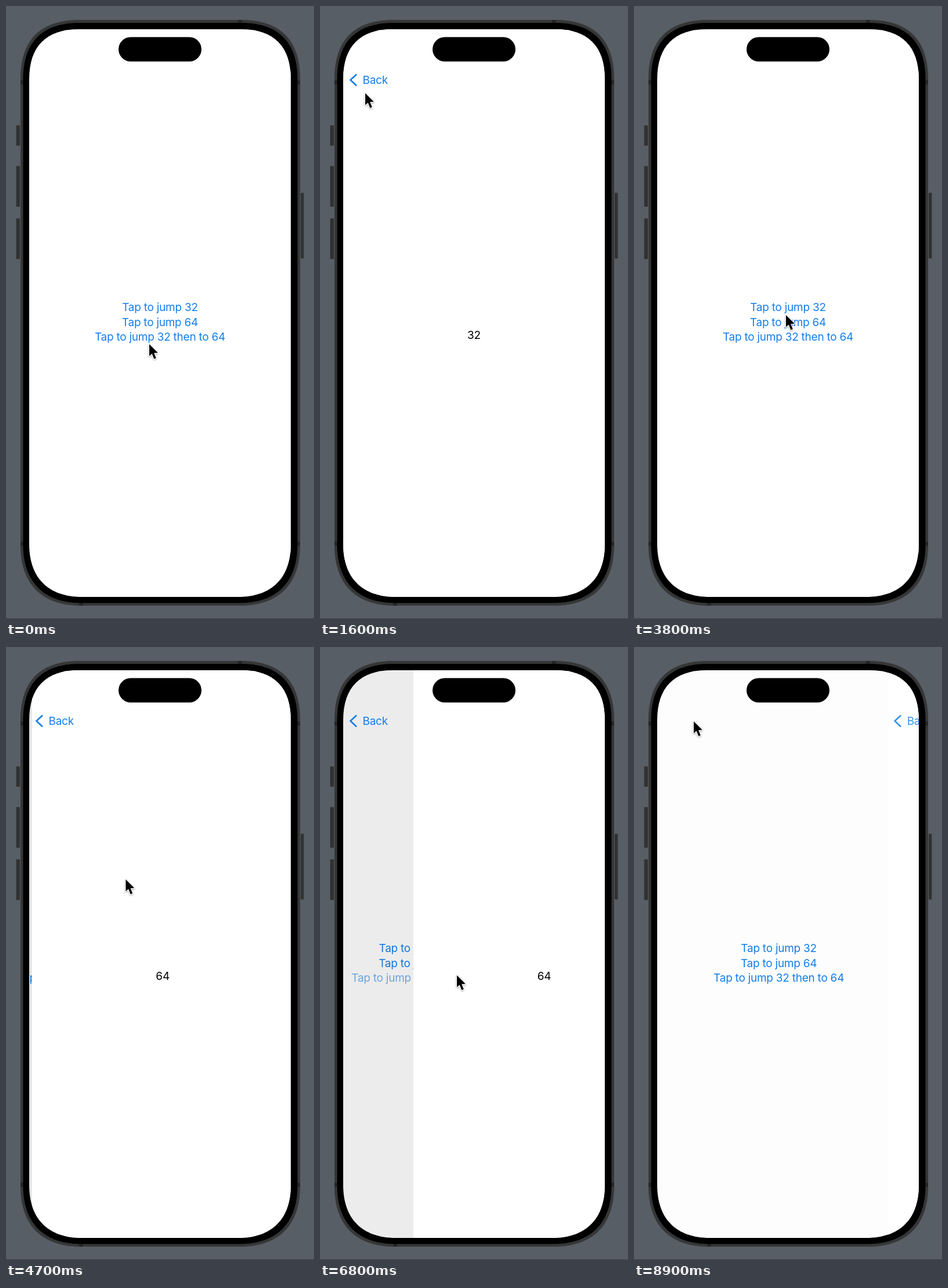
Write an HTML page that moves like this. It is 531 px wide and 1055 px high and loops after 9000 ms.

```html
<!DOCTYPE html>
<html lang="en">
<head>
<meta charset="utf-8">
<title>Navigation jumps</title>
<style>
  html, body { margin: 0; width: 100%; height: 100%; overflow: hidden; background: #575e66; }
  svg { display: block; width: 531px; height: 1055px; }
  text { font: 19px Inter, "Liberation Sans", sans-serif; letter-spacing: -.25px; }
  .link { fill: #147eea; }
  .middle { text-anchor: middle; }
</style>
</head>
<body>
<svg viewBox="0 0 531 1055">
  <defs><clipPath id="screenClip"><path id="screenShape"/></clipPath></defs>
  <rect width="531" height="1055" fill="#575e66"/>
  <rect y="1054" width="531" height="1" fill="#363b41"/>
  <g fill="#303133" stroke="#494b4d">
    <rect x="17.5" y="205.5" width="7" height="35"/>
    <rect x="17.5" y="275.5" width="7" height="70"/>
    <rect x="17.5" y="365.5" width="7" height="70"/>
    <rect x="507.5" y="321.5" width="6" height="113"/>
  </g>
  <path id="rim" fill="#353637" stroke="#5a5c5e"/>
  <g fill="#242526">
    <rect x="400" y="24" width="7" height="6"/>
    <rect x="126" y="1026" width="7" height="6"/>
    <rect x="25" y="128" width="482" height="7"/>
    <rect x="25" y="922" width="482" height="7"/>
  </g>
  <path id="bezel"/>
  <g clip-path="url(#screenClip)">
    <rect x="40" y="40" width="451" height="978" fill="#fff"/>
    <g id="lower">
      <g id="home" class="link middle">
        <text x="265.5" y="525">Tap to jump 32</text>
        <text x="265.5" y="550.5">Tap to jump 64</text>
        <text x="265.5" y="576">Tap to jump 32 then to 64</text>
      </g>
      <text id="lowerNumber" class="middle" x="265.5" y="573">32</text>
    </g>
    <rect id="dim" x="40" y="40" width="451" height="978"/>
    <g id="upper">
      <rect x="40" y="40" width="451" height="978" fill="#fff"/>
      <text id="upperNumber" class="middle" x="265.5" y="573"></text>
    </g>
    <g id="back">
      <path d="M63 117.5L52.5 127.3L63 137.2" fill="none" stroke="#147eea" stroke-width="2.6"/>
      <text class="link" x="73.5" y="134">Back</text>
    </g>
  </g>
  <rect x="194" y="53.5" width="143" height="42" rx="21"/>
  <path id="cursor" d="M0 0V20.5L4.7 16.5L8.3 25.5L11.8 24L8.2 15.2L14.8 14.8Z" stroke="#fff" stroke-width="2.4"
    paint-order="stroke" stroke-linejoin="round" style="filter:drop-shadow(0 1.5px 1.5px rgba(0,0,0,.35))"/>
</svg>
<script>
const $ = id => document.getElementById(id);
const LOOP = 9000, STEP = 100, WIDTH = 450;

// Rectangle with continuous corners that reach e (top) and f (bottom) along each side.
function squircle(x, y, r, b, e, f) {
  const c = e * .34, d = f * .36;
  return `M${x + e} ${y}H${r - e}C${r - c} ${y} ${r} ${y + c} ${r} ${y + e}` +
    `V${b - f}C${r} ${b - d} ${r - d} ${b} ${r - f} ${b}` +
    `H${x + f}C${x + d} ${b} ${x} ${b - d} ${x} ${b - f}` +
    `V${y + e}C${x} ${y + c} ${x + c} ${y} ${x + e} ${y}Z`;
}
$('screenShape').setAttribute('d', squircle(40, 40, 491, 1017, 86, 91));
$('bezel').setAttribute('d', squircle(29.5, 29, 502.5, 1027.5, 97, 100));
$('rim').setAttribute('d', squircle(24.5, 23.5, 507.5, 1032.5, 102, 104));

const transitions = [
  { start: -LOOP, page: 32 },
  { start: 677, page: 32, push: true },
  { start: 1960, page: 32 },
  { start: 4356, page: 64, push: true },
  { start: 5359, page: 64 },
  { start: 6665, page: 64, push: true },
  { start: 7732, page: 64, below: 32 },
  { start: 8708, page: 32 }
];

// Pressed controls: [control, down, up]
const rows = [...$('home').children];
const presses = [
  [rows[0], 600, 677], [$('back'), 1890, 1985],
  [rows[1], 4290, 4360], [$('back'), 5390, 5485],
  [rows[2], 6590, 6675], [$('back'), 7690, 7790], [$('back'), 8690, 8700]
];

// Pointer stops: [time, x, y]
const stops = [
  [0, 247, 582], [500, 262, 516], [720, 262, 516], [1600, 78, 150], [1950, 78, 150],
  [2800, 269, 516], [3100, 223, 527], [3700, 223, 527], [3800, 262, 532], [3900, 258, 532],
  [4400, 258, 532], [5200, 95, 115], [5520, 95, 115], [6300, 170, 533], [6400, 254, 573],
  [6600, 254, 573], [6800, 236, 565], [7300, 125, 160], [7500, 102, 126], [7650, 102, 126],
  [8600, 103, 128], [LOOP, 103, 128]
];

const move = (el, x, y = 0) => el.setAttribute('transform', `translate(${x} ${y})`);
const show = (el, on) => el.style.display = on ? '' : 'none';

// Critically damped spring, from 1 to 0
function springLeft(ms) {
  const x = ms * .0192;
  return (1 + x) * Math.exp(-x);
}

function pressOpacity(control, t) {
  const press = presses.filter(p => p[0] === control && p[1] <= t).pop();
  return press ? Math.min(1, .2 + .8 * Math.max(0, t - press[2]) / 250) : 1;
}

function pointer(t) {
  const i = stops.findIndex(s => s[0] > t);
  const [t0, x0, y0] = stops[i - 1], [t1, x1, y1] = stops[i];
  const u = (t - t0) / (t1 - t0), k = u * u * (3 - 2 * u);
  return [x0 + (x1 - x0) * k, y0 + (y1 - y0) * k];
}

function draw(t) {
  const { start, page, push, below } = transitions.filter(s => s.start <= t).pop();
  const left = springLeft(t - start);
  const open = push ? 1 - left : left;
  const offset = WIDTH * (1 - open);

  show($('home'), !below);
  show($('lowerNumber'), below);
  move($('lower'), -.3 * WIDTH * open);
  $('dim').setAttribute('opacity', .106 * open ** 1.2);
  $('upperNumber').textContent = page;
  move($('upper'), offset);

  const stays = push || below;
  move($('back'), stays ? 0 : offset);
  const fadeIn = push ? Math.min(1, (t - start) / 120) : 1;
  $('back').setAttribute('opacity', fadeIn * pressOpacity($('back'), t));
  rows.forEach(row => row.setAttribute('opacity', pressOpacity(row, t)));
  move($('cursor'), ...pointer(t));
}

// The picture advances ten times a second.
function tick() {
  draw(Math.floor(performance.now() % LOOP / STEP) * STEP);
  requestAnimationFrame(tick);
}
tick();
</script>
</body>
</html>
```
